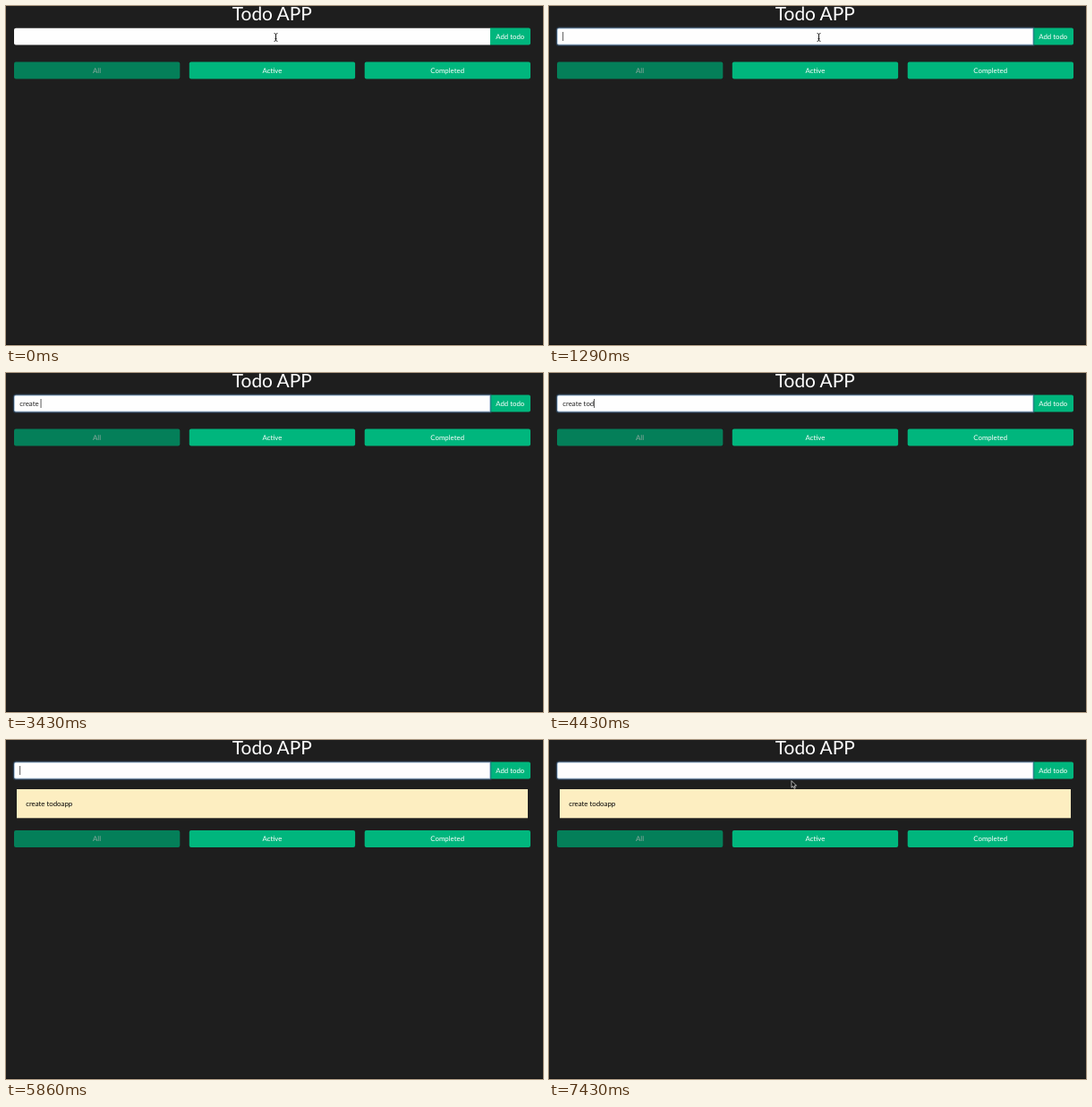
These frames come from a looping animation (600 px wide and 379 px high, 8000 ms). An HTML page:

```html
<!DOCTYPE html>
<html lang="en">
<head>
<meta charset="utf-8">
<title>Todo APP</title>
<style>
  html, body { margin: 0; width: 100%; height: 100%; overflow: hidden; background: #1e1e1e; }
  svg { display: block; width: 100%; height: 100%; }
  text { font: 7.84px Lato, sans-serif; text-rendering: geometricPrecision; }
  .title { font-size: 20.9px; fill: #fff; }
  .mid { text-anchor: middle; }
  .label { fill: #fff; }
  .green { fill: #00b67d; }
  .off .green { fill: #047f59; }
  .off .label { fill: #93aca2; }
  #filters, #row, #ring, #caret, #beam, #arrow { will-change: transform; }
</style>
</head>
<body>
<svg viewBox="0 0 600 379">
  <rect width="600" height="379" fill="#1e1e1e"/>
  <rect y="378" width="600" height="1" fill="#141414"/>
  <text class="title mid" x="297.3" y="16">Todo APP</text>

  <path class="green" d="M541 24.5h43a2 2 0 0 1 2 2v15a2 2 0 0 1-2 2h-43z"/>
  <text class="label mid" x="563.3" y="36.9">Add todo</text>

  <path d="M541 24.8h-30H11a2 2 0 0 0-2 2v14.6a2 2 0 0 0 2 2h530z" fill="#fefefe"/>
  <g id="ring" fill="none">
    <path d="M541.7 24.2H11a2.6 2.6 0 0 0-2.6 2.6v14.6a2.6 2.6 0 0 0 2.6 2.6h530.7z" stroke="#375a7f" stroke-opacity=".5" stroke-width="1.3"/>
    <path d="M540.7 25.1H11a1.7 1.7 0 0 0-1.7 1.7v14.6a1.7 1.7 0 0 0 1.7 1.7h529.7z" stroke="#739ac2" stroke-width=".6"/>
  </g>
  <text id="entry" x="15.3" y="36.9" fill="#222" xml:space="preserve"></text>
  <rect id="caret" x="15.3" y="29" width=".8" height="10" fill="#333"/>

  <g id="row">
    <rect x="12" y="55" width="571" height="32.3" fill="#fdeec1"/>
    <text x="22.2" y="74.1" fill="#000">create todoapp</text>
  </g>

  <g id="filters">
    <g class="off">
      <rect class="green" x="9" y="62.4" width="185.3" height="19" rx="2"/>
      <text class="label mid" x="101.5" y="74.7">All</text>
    </g>
    <rect class="green" x="204.8" y="62.4" width="185.3" height="19" rx="2"/>
    <text class="label mid" x="297.4" y="74.7">Active</text>
    <rect class="green" x="400.7" y="62.4" width="185.3" height="19" rx="2"/>
    <text class="label mid" x="493.2" y="74.7">Completed</text>
  </g>

  <path id="beam" d="M299.5 30.6q2 0 2 1.2v6.4q0 1.2-2 1.2M303.5 30.6q-2 0-2 1.2v6.4q0 1.2 2 1.2M300.4 36.6h2.2" fill="none" stroke="#111" stroke-width=".8"/>
  <path id="arrow" d="M271 45.6v7.6l1.8-1.6 1.2 2.7 1.3-.6-1.2-2.6h2.4z" fill="#000" stroke="#fff" stroke-width=".7"/>
</svg>
<script>
  const LOOP = 8000, PHRASE = "create todoapp", ADDED = 5860;
  const keyTimes = [2430, 2710, 2860, 3000, 3070, 3140, 3430, 3860, 4000, 4430, 4570, 4860, 5000, 5140];
  const caretSpans = [[290, 710], [1290, 1710], [2290, 5710], [ADDED, 6290], [6860, 7430]];
  const [entry, caret, row, filters, ring, beam, arrow] =
    ["entry", "caret", "row", "filters", "ring", "beam", "arrow"].map(id => document.getElementById(id));

  const show = (el, on) => el.setAttribute("visibility", on ? "visible" : "hidden");

  function draw(t) {
    const added = t >= ADDED;
    const typed = added ? "" : PHRASE.slice(0, keyTimes.filter(k => k <= t).length);
    if (entry.textContent !== typed) entry.textContent = typed;
    caret.setAttribute("x", 15.3 + (typed ? entry.getComputedTextLength() : 0));
    show(caret, caretSpans.some(([from, to]) => t >= from && t < to));
    show(row, added);
    filters.setAttribute("transform", `translate(0 ${added ? 38.6 : 0})`);
    ring.setAttribute("opacity", t < 140 ? 0 : t < 290 ? 0.5 : 1);
    show(beam, t < 2430);
    show(arrow, t >= 6570);
  }

  function tick() {
    draw(performance.now() % LOOP);
    requestAnimationFrame(tick);
  }
  tick();
</script>
</body>
</html>
```
